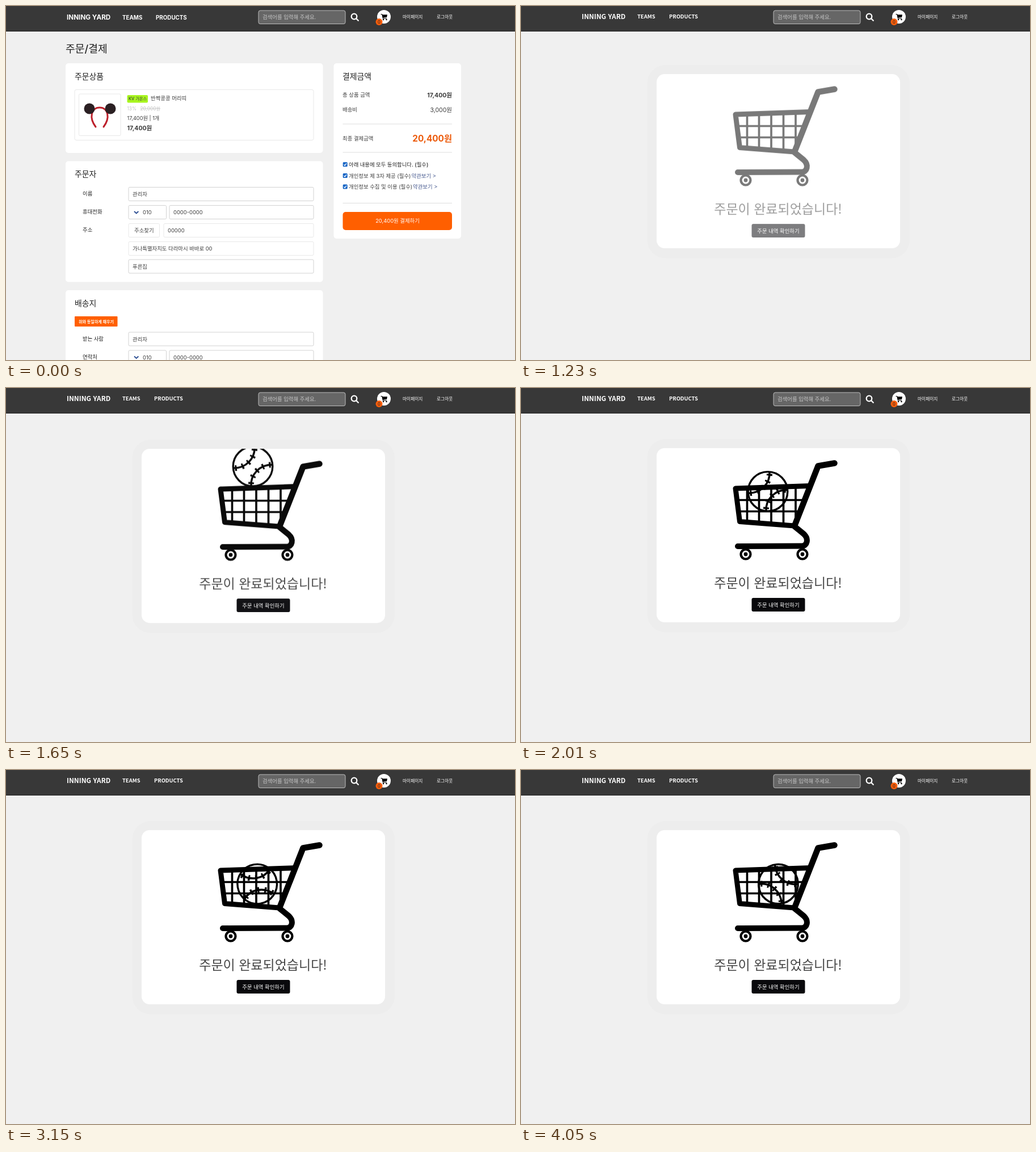
Animation, 897 px wide and 624 px high, one loop 4.08 s. Source, as an HTML page:

```html
<!DOCTYPE html>
<html lang="ko">
<head>
<meta charset="utf-8">
<style>
  html, body { margin: 0; height: 100%; overflow: hidden; background: #f0f0f0; }
  svg { display: block; width: 897px; height: 624px; }
  text { font: 9.4px Inter, "Noto Sans CJK KR", "Noto Sans CJK", sans-serif; fill: #3c3c3c; white-space: pre; }
  .noto text { font-family: "Noto Sans CJK KR", "Noto Sans CJK", sans-serif; }
  .panel { fill: #fff; }
  .field { fill: #fff; stroke: #d2d2d2; }
  .soft { fill: #fff; stroke: #e8e8e8; }
  .rule { stroke: #dedede; }
  .line { fill: none; stroke: #000; }
  .round { stroke-linecap: round; stroke-linejoin: round; }
  text.h { font-size: 13.9px; font-weight: 500; fill: #222; }
  text.label { font-weight: 500; fill: #222; }
  text.b { font-weight: 700; }
  text.w { fill: #fff; }
  text.small { font-size: 7.7px; }
  text.dim { font-size: 8.3px; fill: #c4c4c4; }
  text.link { fill: #46598f; }
  text.end { text-anchor: end; }
  text.mid { text-anchor: middle; }
</style>
</head>
<body>
<svg viewBox="0 0 897 624">
  <defs>
    <clipPath id="cardClip"><rect x="239" y="106" width="429" height="307" rx="14"/></clipPath>
    <g id="check">
      <rect width="8" height="8" rx="1.5" fill="#1565c5"/>
      <path d="M1.8 4.2l1.6 1.7 2.9-3.8" fill="none" stroke="#fff" stroke-width="1.3"/>
    </g>
    <g id="phone">
      <rect class="field" x="216" y=".5" width="66.500" height="24" rx="2"/>
      <rect class="field" x="288" y=".5" width="254" height="24" rx="2"/>
      <path d="M226 11l3.700 3.500 3.700-3.500" fill="none" stroke="#2b4d92" stroke-width="1.800"/>
      <text x="241" y="16">010</text>
      <text x="295" y="16">0000-0000</text>
    </g>
    <g id="seam" class="line">
      <path d="M3-34C4-14-12 3-34 3" stroke-width="3.500"/>
      <path d="M3-34C4-14-12 3-34 3" stroke-width="10" stroke-dasharray="3.200 9.300" stroke-dashoffset="-3"/>
    </g>
    <g id="wheel" class="line">
      <circle r="8.500" stroke-width="4.200"/>
      <circle r="3.400" fill="#000" stroke="none"/>
    </g>
  </defs>

  <rect width="897" height="624" fill="#f0f0f0"/>
  <rect id="blank" width="897" height="56" fill="#fff"/>

  <g id="header">
    <rect width="897" height="45" fill="#383838"/>
    <path d="M0 44.500H897" stroke="#262626"/>
    <rect x="445" y="8" width="153" height="23.500" rx="3" fill="#666" stroke="#bdbdbd"/>
    <g class="noto">
      <text x="452" y="23" style="fill:#c6c6c6">검색어를 입력해 주세요.</text>
      <text class="w small" x="699" y="22">마이페이지</text>
      <text class="w small" x="759" y="22">로그아웃</text>
    </g>
    <g fill="none" stroke="#fff" stroke-width="2.300">
      <circle cx="613.500" cy="18.500" r="4.800"/>
      <path class="round" d="M617.500 22.500l3.300 3.300"/>
    </g>
    <circle cx="666" cy="19" r="12" fill="#fff"/>
    <path d="M660.500 14.500h2.200l1.800 7.500h6.500" class="line" stroke-width="1.200"/>
    <path d="M663 15.200h9l-1 4.800-6.800.8z"/>
    <circle cx="665" cy="24" r="1.200"/><circle cx="670.500" cy="24" r="1.200"/>
    <circle cx="657.500" cy="28" r="6" fill="#f75d0b"/>
    <text class="mid" x="657.500" y="30.800" style="font-size:7.7px;fill:#222">0</text>
  </g>

  <g id="order">
    <text class="w b" x="107" y="24" style="font-size:11.700px">INNING YARD</text>
    <text class="w b" x="205" y="23.500" style="font-size:9.800px">TEAMS</text>
    <text class="w b" x="264" y="23.500" style="font-size:9.800px">PRODUCTS</text>
    <text class="h" x="105" y="82" style="font-size:18.200px">주문/결제</text>

    <g class="panel">
      <rect x="105" y="101" width="453.500" height="158" rx="5"/>
      <rect x="105" y="273.500" width="453.500" height="213" rx="5"/>
      <rect x="105" y="501" width="453.500" height="140" rx="5"/>
      <rect x="577.500" y="101" width="224.500" height="309" rx="5"/>
    </g>

    <text class="h" x="121" y="129">주문상품</text>
    <rect class="soft" x="121" y="147.500" width="421" height="89" rx="3"/>
    <rect class="soft" x="128.500" y="155" width="73.500" height="73.500" rx="2"/>
    <path class="line round" d="M158 213C146 197 150 179 165 179S184 197 172 213" style="stroke:#bd202b" stroke-width="3"/>
    <g fill="#2b2023"><circle cx="147" cy="181" r="9.500"/><circle cx="184" cy="181" r="9.500"/></g>
    <rect x="213.500" y="157" width="36.500" height="13.500" rx="2" fill="#a8f51f"/>
    <text x="216" y="166.300" style="font-size:7.300px;font-weight:500">KV 가온스</text>
    <text x="255" y="166">반짝콩콩 머리띠</text>
    <text class="dim" x="213.500" y="183.500">13%</text>
    <text class="dim" x="236.500" y="183.500" text-decoration="line-through">20,000원</text>
    <text x="213.500" y="200.500" style="font-size:9.200px">17,400원 | 1개</text>
    <text class="b" x="213.500" y="219" style="font-size:10.500px">17,400원</text>

    <text class="h" x="121" y="301">주문자</text>
    <text class="label" x="135" y="333.500">이름</text>
    <text class="label" x="135" y="365.500">휴대전화</text>
    <text class="label" x="135" y="397.500">주소</text>
    <rect class="field" x="216" y="319.500" width="326" height="24" rx="2"/>
    <text x="223" y="335">관리자</text>
    <use href="#phone" y="351"/>
    <rect class="soft" x="216" y="383.500" width="54.500" height="24" rx="2"/>
    <text x="226" y="399">주소찾기</text>
    <rect class="soft" x="278" y="383.500" width="264" height="24" rx="2"/>
    <text x="285" y="399">00000</text>
    <rect class="soft" x="216" y="415.500" width="326" height="24" rx="2"/>
    <text x="223" y="431">가나특별자치도 다라마시 바바로 00</text>
    <rect class="field" x="216" y="447" width="326" height="24" rx="2"/>
    <text x="223" y="462.500">푸른집</text>

    <text class="h" x="121" y="528.500">배송지</text>
    <rect x="121" y="547" width="75.500" height="18" rx="1" fill="#ff5f00"/>
    <text class="w b" x="128" y="559" style="font-size:7.100px">위와 동일하게 채우기</text>
    <text class="label" x="135" y="589.500">받는 사람</text>
    <text class="label" x="135" y="621.500">연락처</text>
    <rect class="field" x="216" y="575" width="326" height="24" rx="2"/>
    <text x="223" y="590.500">관리자</text>
    <use href="#phone" y="606.500"/>

    <text class="h" x="593" y="129">결제금액</text>
    <text x="593" y="160">총 상품 금액</text>
    <text class="b end" x="786" y="161" style="font-size:10.500px">17,400원</text>
    <text x="593" y="186">배송비</text>
    <text class="end" x="786" y="186.500" style="font-size:10.500px">3,000원</text>
    <text x="593" y="236.500">최종 결제금액</text>
    <text class="b end" x="786" y="238.500" style="font-size:15.300px;fill:#ec5b0c">20,400원</text>
    <path class="rule" d="M593.500 208H786M593.500 258H786M593.500 347.500H786"/>
    <use href="#check" x="593.700" y="275.300"/>
    <use href="#check" x="593.700" y="295"/>
    <use href="#check" x="593.700" y="314.500"/>
    <text class="label" x="604" y="283">아래 내용에 모두 동의합니다. (필수)</text>
    <text x="604" y="302.800">개인정보 제 3자 제공 (필수)</text>
    <text class="link" x="714.500" y="302.800">약관보기 &gt;</text>
    <text x="604" y="322.300">개인정보 수집 및 이용 (필수)</text>
    <text class="link" x="717" y="322.300">약관보기 &gt;</text>
    <rect x="593.500" y="363" width="192.500" height="32" rx="5" fill="#ff5f00"/>
    <text class="w mid" x="690" y="382.300">20,400원 결제하기</text>
  </g>

  <g id="done" class="noto">
    <text class="w b" x="107" y="23" style="font-size:11.900px">INNING YARD</text>
    <text class="w b" x="205" y="22.300">TEAMS</text>
    <text class="w b" x="261" y="22.300">PRODUCTS</text>
    <g id="card">
      <rect x="222.500" y="90" width="462.500" height="340.500" rx="32" fill="#ededed"/>
      <rect x="239" y="106" width="429" height="307" rx="14" fill="#fff"/>
      <g id="content" clip-path="url(#cardClip)">
        <g class="line round">
          <path d="M552.500 132.500L523.500 137.500 482 243" stroke-width="10.500"/>
          <path d="M509 172.500L378 177 385.500 235.500 482 243" stroke-width="9"/>
          <path d="M482 244L498 257C508 266 504 278.500 495 278.500L382 279" stroke-width="10"/>
        </g>
        <path class="line" stroke-width="3.700" d="M398.500 176V237M419.500 176V238M441 175V240M462.500 174V241M484 173V240M380 197.500H500M383 217.500H492"/>
        <use href="#wheel" x="396" y="293"/>
        <use href="#wheel" x="496" y="293"/>
        <g id="ball">
          <circle class="line" r="34.800" stroke-width="3.400"/>
          <use href="#seam"/>
          <use href="#seam" transform="rotate(180)"/>
        </g>
        <text class="mid" x="453" y="352" style="font-size:23px;font-weight:500;fill:#444">주문이 완료되었습니다!</text>
        <rect x="406.500" y="370" width="94" height="24" rx="3" fill="#09090c"/>
        <text class="w mid" x="453.500" y="385.500">주문 내역 확인하기</text>
      </g>
    </g>
  </g>
</svg>
<script>
  const LOOP = 4080, LEAVE = 960, ARRIVE = 1020;
  const $ = id => document.getElementById(id);
  const span = (t, start, end) => Math.min(1, Math.max(0, (t - start) / (end - start)));
  const show = (id, on) => $(id).style.display = on ? '' : 'none';

  // Height of the ball above the basket floor: one fall, then shrinking bounces.
  function ballHeight(t) {
    if (t < 1872) return 150 * (1 - span(t, LEAVE, 1872) ** 2);
    const hop = (start, end, height) => {
      const p = span(t, start, end);
      return 4 * height * p * (1 - p);
    };
    return hop(1872, 2400, 24) + hop(2400, 2664, 6) + hop(2664, 2796, 1.5);
  }

  function draw(t) {
    show('order', t < LEAVE);
    show('header', t < LEAVE || t >= ARRIVE);
    show('blank', t >= LEAVE && t < ARRIVE);
    show('done', t >= ARRIVE);

    const shown = 1 - (1 - span(t, ARRIVE, 1970)) ** 3;
    $('card').setAttribute('transform', `translate(0 ${30 * (1 - shown)})`);
    $('content').setAttribute('opacity', shown);

    const p = span(t, 2250, 4350), roll = p * p * (3 - 2 * p);
    $('ball').setAttribute('transform',
      `translate(${435 + 19.5 * roll} ${201 - ballHeight(t)}) rotate(${90 * roll})`);
  }

  const begin = performance.now();
  function tick() {
    draw((performance.now() - begin) % LOOP);
    requestAnimationFrame(tick);
  }
  tick();
</script>
</body>
</html>
```
